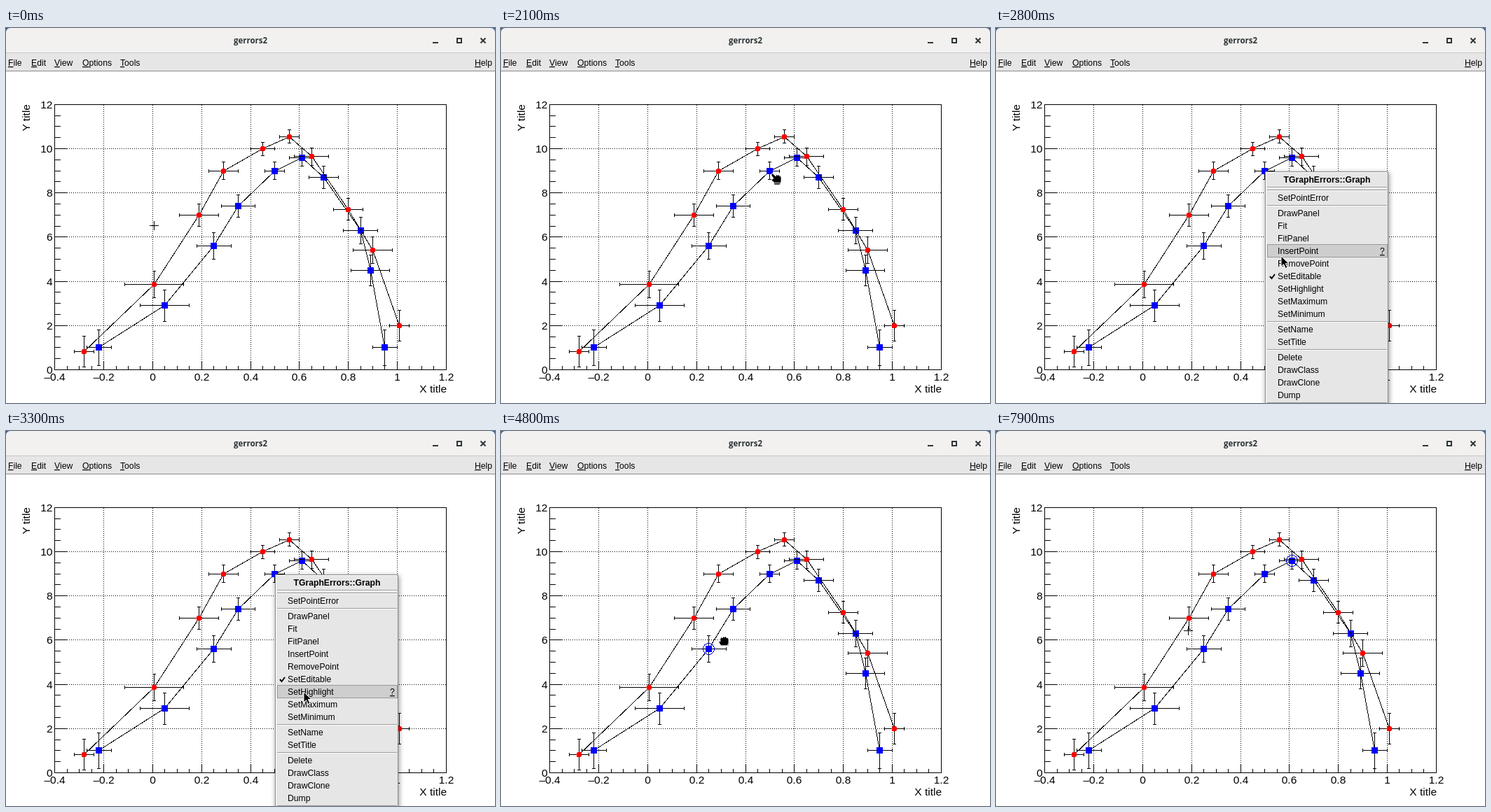
Write an HTML page that moves like this. It is 698 px wide and 536 px high and loops after 8 s.

```html
<!DOCTYPE html>
<html lang="en">
<head>
<meta charset="utf-8">
<title>gerrors2</title>
<style>
html, body { margin: 0; width: 100%; height: 100%; overflow: hidden; background: #fff; }
svg { display: block; width: 698px; height: 536px; }
text { font: 12.2px "Liberation Sans", Arial, sans-serif; white-space: pre; }
.label text { font-size: 15.5px; }
.crisp { shape-rendering: crispEdges; }
.shadow { filter: drop-shadow(1px 2px 3.5px rgba(0, 0, 0, .45)); }
</style>
</head>
<body>
<svg id="stage" viewBox="0 0 698 536"></svg>
<script>
const STEP = 100, LOOP = 8000;
const $ = id => document.getElementById(id);
const px = x => Math.floor(69.8 + (x + 0.4) * 349) + 0.5;
const py = y => Math.floor(488.55 - y * 31.6) + 0.5;
const path = (d, attrs = 'stroke="#000" fill="none"') => `<path d="${d}" ${attrs}/>`;
const rect = (x, y, w, h, fill, more = '') =>
  `<rect x="${x}" y="${y}" width="${w}" height="${h}" fill="${fill}" ${more}/>`;
const text = (x, y, s, more = '') => `<text x="${x}" y="${y}" ${more}>${s}</text>`;

// x, y, error in x; the error in y grows away from the middle point
const blue = [
  [-.22, 1, .05], [.05, 2.9, .1], [.25, 5.6, .07], [.35, 7.4, .07], [.5, 9, .04],
  [.61, 9.6, .05], [.7, 8.7, .06], [.85, 6.3, .07], [.89, 4.5, .08], [.95, 1, .05]];
const red = [
  [-.28, .82, .04], [.005, 3.86, .12], [.19, 7, .08], [.29, 9, .06], [.45, 10, .05],
  [.56, 10.55, .04], [.65, 9.64, .07], [.8, 7.26, .06], [.9, 5.42, .08], [1.01, 2, .04]];

function windowFrame() {
  const item = (x, word) =>
    text(x, 54, `<tspan text-decoration="underline">${word[0]}</tspan>${word.slice(1)}`);
  return rect(0, 0, 698, 20, '#3f5f8a') +
    rect(0, 0, 698, 45, '#f2f1f0', 'rx="6"') +
    rect(0, 35, 698, 1, '#c8c8c8') + rect(0, 36, 698, 25, '#e6e6e6') + rect(0, 61, 698, 1, '#8c8c8c') +
    rect(0, 62, 698, 474, '#fff') +
    text(349, 22, 'gerrors2',
      'text-anchor="middle" fill="#2e3436" style="font:700 11.5px \'Open Sans\',sans-serif"') +
    rect(609, 20, 8, 2, '#2e3436') +
    path('M644 15H650V21H644Z', 'fill="none" stroke="#2e3436" stroke-width="2"') +
    path('M677.5 14.5L684.5 21.5M684.5 14.5L677.5 21.5', 'stroke="#2e3436" stroke-width="2"') +
    item(3, 'File') + item(36, 'Edit') + item(69, 'View') + item(109, 'Options') +
    item(163, 'Tools') + item(669, 'Help');
}

function axes() {
  const x0 = px(-0.4), x1 = px(1.2), y0 = py(0), y1 = py(12);
  let grid = '', ticks = `M${x0} ${y1}H${x1}V${y0}H${x0}Z`, labels = '';
  for (let i = 0; i <= 32; i++) {
    const x = px(-0.4 + i * 0.05 + 1e-6), major = i % 4 == 0;
    ticks += `M${x} ${y0}v${major ? -12 : -6}`;
    if (!major) continue;
    if (i && i < 32) grid += `M${x} ${y0 + 0.5}V${y1}`;
    labels += text(x, 504, String((i - 8) / 20).replace('-', '–'), 'text-anchor="middle"');
  }
  for (let i = 0; i <= 24; i++) {
    const y = py(i / 2), major = i % 4 == 0;
    ticks += `M${x0} ${y}h${major ? 17 : 8}`;
    if (!major) continue;
    if (i && i < 24) grid += `M${x0 - 0.5} ${y}H${x1}`;
    labels += text(66.5, y + 5, i / 2, 'text-anchor="end"');
  }
  labels += text(629, 521, 'X title', 'text-anchor="end"') +
    text(0, 0, 'Y title', 'text-anchor="end" transform="translate(34 109) rotate(-90)"');
  return `<g class="crisp">${path(grid, 'stroke="#000" fill="none" stroke-dasharray="1 2"')}${path(ticks)}</g>` +
    `<g class="label">${labels}</g>`;
}

function graph(points, minError, marker) {
  let line = '', bars = '', marks = '';
  points.forEach(([x, y, ex], i) => {
    const ey = minError + 0.1 * Math.floor(Math.abs(i - 4.5));
    const cx = px(x), cy = py(y), l = px(x - ex), r = px(x + ex), t = py(y + ey), b = py(y - ey);
    line += `${i ? 'L' : 'M'}${cx} ${cy}`;
    bars += `M${l} ${cy}H${r}M${cx} ${t}V${b}` +
      `M${l} ${cy - 2.5}v5M${r} ${cy - 2.5}v5M${cx - 2.5} ${t}h5M${cx - 2.5} ${b}h5`;
    marks += marker(cx, cy);
  });
  return `<g class="crisp">${path(line)}${path(bars)}${marks}</g>`;
}

const groups = [
  'SetPointError',
  'DrawPanel Fit FitPanel InsertPoint RemovePoint SetEditable SetHighlight SetMaximum SetMinimum',
  'SetName SetTitle',
  'Delete DrawClass DrawClone Dump'].map(g => g.split(' '));
const entries = groups.flatMap((g, n) => g.map((name, i) => {
  const before = groups.slice(0, n).flat().length;
  return { name, y: 247 + 18 * (before + i) + 4 * n, last: i == g.length - 1 };
}));

function menu() {
  const rule = y => rect(387, y, 171, 1, '#9a9a9a') + rect(387, y + 1, 171, 1, '#fff');
  return rect(384, 205, 176, 340, '#e6e6e6', 'class="shadow"') +
    path('M384.5 536V205.5H559.5V536', 'fill="none" stroke="#8a8a8a"') +
    path('M385.5 536V206.5H558', 'fill="none" stroke="#fff"') +
    text(472.5, 220.5, 'TGraphErrors::Graph', 'text-anchor="middle" font-weight="700" style="font-weight:700"') +
    rule(227) + rule(231) +
    entries.map(e => e.last ? rule(e.y + 6) : '').join('') +
    `<g id="hover">${rect(387.5, 0.5, 171, 18, '#cecece', 'stroke="#999"')}` +
    text(548, 14, '?', 'text-decoration="underline"') + '</g>' +
    entries.map(e => text(402, e.y, e.name)).join('') +
    path('M391 355L393.5 358L398 352', 'fill="none" stroke="#000" stroke-width="2"');
}

const cursors = {
  cross: path('M-6 .5H7M.5 -6V7', 'stroke="#000" class="crisp"'),
  arrow: path('M0 0V15L3.5 11.7L6.3 17.5L9 16.2L6.3 10.6H11Z', 'fill="#000" stroke="#fff"'),
  hand: path('M-7 -8Q-5 -9 -3 -6L-1 -4Q1 -9 2 -5Q4 -8 5 -4Q7 -6 7 -2V3L5 8H-3L-4 4L-7 2L-6 0L-4 -1L-7 -5Z',
    'fill="#000" stroke="#fff" stroke-width=".8"') + path('M-3 5.5H5', 'stroke="#ddd"'),
  fist: path('M-5 -4Q-3 -8 -2 -5Q0 -9 1 -6Q3 -9 4 -5Q7 -7 7 -2V2L5 6H-4L-7 1L-7 -1L-5 0Z',
    'fill="#000" stroke="#fff" stroke-width=".8"') + path('M-4 5.5H7V2', 'fill="none" stroke="#aaa"')
};

// pointer moves: start, end, and the place reached; it rests in between
const moves = [
  [0, 400, 264, 284], [500, 1400, 372, 237], [1500, 1900, 399, 217], [2000, 2100, 393, 216],
  [2200, 2300, 387, 208], [2500, 2800, 407, 326], [2800, 3300, 425, 373], [3500, 4400, 368, 337],
  [4400, 4800, 318, 301], [4800, 5300, 340, 256], [5300, 5800, 414, 189], [5900, 6100, 410, 161],
  [6200, 6900, 331, 209], [7000, 7900, 274, 285]];
const shapes = [[0, 'cross'], [1800, 'hand'], [2300, 'arrow'], [3600, 'cross'], [4700, 'fist'], [6100, 'cross']];

function pointer(t) {
  let x = 211, y = 282;
  for (const [start, end, toX, toY] of moves) {
    const u = Math.min(1, Math.max(0, (t - start) / (end - start)));
    x += (toX - x) * u;
    y += (toY - y) * u;
  }
  return [Math.round(x), Math.round(y)];
}

function nearest([x, y]) {
  const spots = blue.map(p => [px(p[0]), py(p[1])]);
  const dist = p => Math.hypot(p[0] - x, p[1] - y);
  return spots.reduce((a, b) => dist(b) < dist(a) ? b : a);
}

const show = (id, on) => $(id).setAttribute('visibility', on ? 'inherit' : 'hidden');
const move = (id, x, y) => $(id).setAttribute('transform', `translate(${x} ${y})`);

$('stage').innerHTML = windowFrame() + axes() +
  graph(blue, 0.4, (x, y) => rect(x - 4.5, y - 4.5, 9, 9, '#00f')) +
  graph(red, 0.3, (x, y) => `<circle cx="${x}" cy="${y}" r="4" fill="#f00"/>`) +
  '<circle id="ring" r="8" fill="none" stroke="#00c" class="crisp"/>' +
  `<g id="menu">${menu()}</g>` +
  Object.keys(cursors).map(k => `<g id="${k}">${cursors[k]}</g>`).join('');

function draw(now) {
  const t = Math.floor(now % LOOP / STEP) * STEP;
  const [x, y] = pointer(t);
  const shape = shapes.filter(s => s[0] <= t).pop()[1];
  for (const k in cursors) show(k, k == shape);
  move(shape, x, y);

  show('ring', t >= 4400);
  move('ring', ...nearest(pointer(Math.min(t, 5900))));

  show('menu', t >= 2300 && t < 3600);
  const over = entries.find(e => y >= e.y - 13 && y < e.y + 5);
  show('hover', over);
  if (over) move('hover', 0, over.y - 14);
  requestAnimationFrame(draw);
}
requestAnimationFrame(draw);
</script>
</body>
</html>
```
